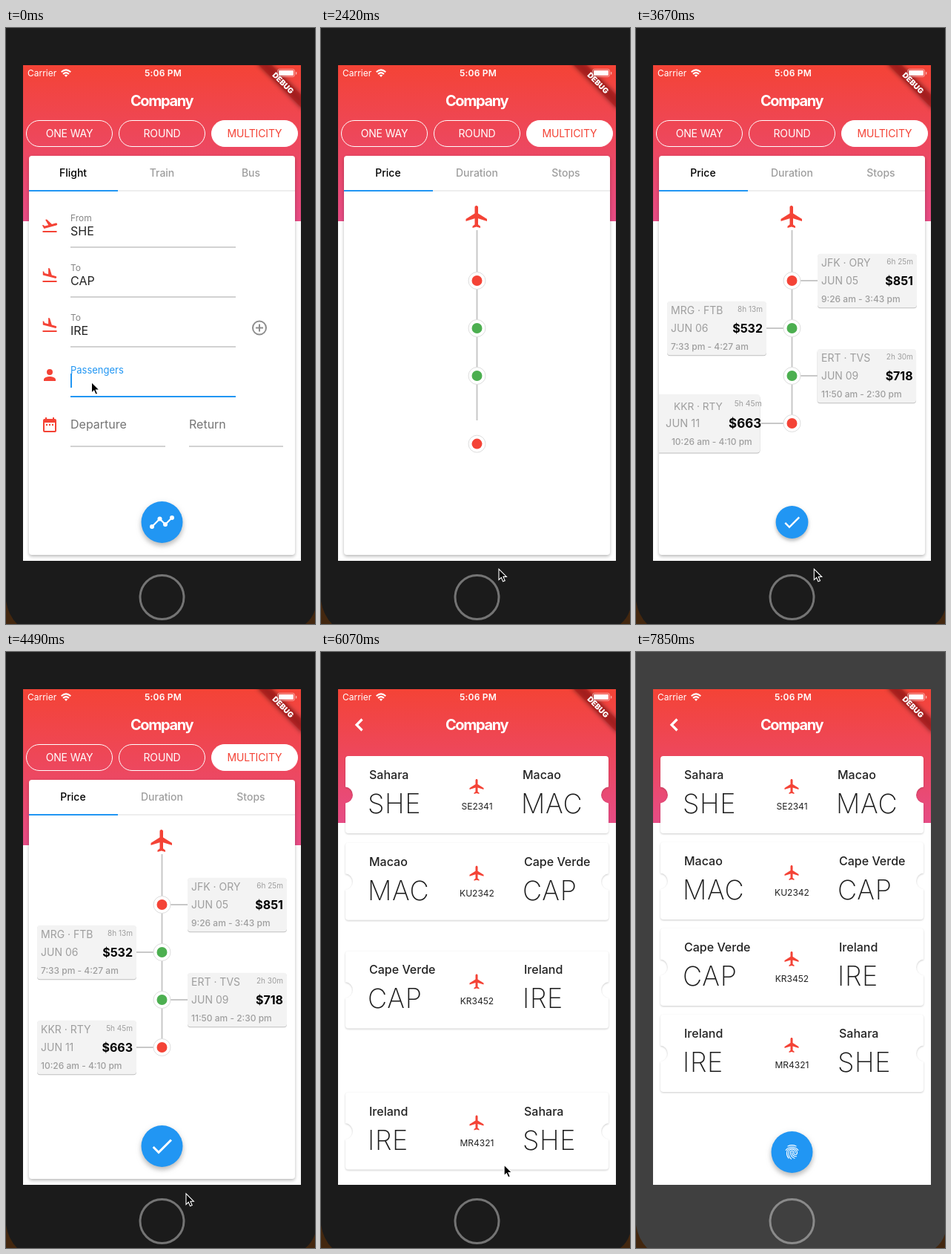
An HTML page for the animation above (7.91 s loop, 417 by 802 pixels).

```html
<!DOCTYPE html>
<html lang="en">
<head>
<meta charset="utf-8">
<title>Flight search</title>
<style>
  html, body { margin: 0; width: 100%; height: 100%; overflow: hidden; background: #1b1b1b; }
  svg { display: block; width: 417px; height: 802px; font-family: Inter, "Open Sans", sans-serif; }
  .title { font-size: 20px; font-weight: 700; letter-spacing: -1.4px; }
  .mid { text-anchor: middle; }
  .end { text-anchor: end; }
  .tab { font-size: 14px; font-weight: 500; text-anchor: middle; fill: #9e9e9e; }
  .tab.on { fill: #000; }
  .pill { font-size: 14px; letter-spacing: -.15px; text-anchor: middle; }
  .label { font-size: 12px; fill: #858585; }
  .value { font-size: 16px; fill: #222; }
  .hint { font-size: 16px; fill: #757575; }
  .city { font-size: 16px; font-weight: 500; fill: #222; }
  .code { font-size: 36px; font-weight: 250; letter-spacing: .7px; fill: #1c1c1c; }
  .flight { font-size: 12px; text-anchor: middle; fill: #222; }
  .card { filter: drop-shadow(0 2px 2px rgba(0,0,0,.28)); }
  .stop { filter: drop-shadow(0 1px .7px rgba(0,0,0,.25)); }
  .fab { filter: drop-shadow(0 4px 3px rgba(0,0,0,.2)) drop-shadow(0 2px 4px rgba(0,0,0,.1)); }
  .ticket { filter: drop-shadow(0 1px 1px rgba(0,0,0,.2)); }
  .banner { filter: drop-shadow(0 0 3px rgba(0,0,0,.8)); }
</style>
</head>
<body>
<svg id="stage" viewBox="0 0 417 802"></svg>
<script>
const LOOP = 7910;
const RED = '#f44336', GREEN = '#4caf50', BLUE = '#2196f3', LINE = '#c8c8c8';

const PATHS = {
  plane: 'M21 16v-2l-8-5V3.5c0-.83-.67-1.5-1.5-1.5S10 2.67 10 3.5V9l-8 5v2l8-2.5V19l-2 1.5V22l3.5-1 3.5 1v-1.5L13 19v-5.5l8 2.5z',
  takeoff: 'M2.5 19h19v2h-19zm19.57-9.36c-.21-.8-1.04-1.28-1.84-1.06L14.92 10l-6.9-6.43-1.93.51 4.14 7.17-4.97 1.33-1.97-1.54-1.45.39 2.59 4.49L21 11.49c.81-.23 1.28-1.05 1.07-1.85z',
  land: 'M2.5 19h19v2h-19zm7.18-5.73l9.66 2.58c.8.21 1.62-.26 1.84-1.06.21-.8-.26-1.62-1.06-1.84l-5.31-1.42-2.76-9.02L10.12 2v8.28L5.15 8.95l-.93-2.32-1.45-.39v5.17z',
  person: 'M12 12a4 4 0 1 0 0-8 4 4 0 0 0 0 8zm0 2c-2.67 0-8 1.34-8 4v2h16v-2c0-2.66-5.33-4-8-4z',
  date: 'M9 11H7v2h2zm4 0h-2v2h2zm4 0h-2v2h2zm2-7h-1V2h-2v2H8V2H6v2H5a2 2 0 0 0-2 2v14a2 2 0 0 0 2 2h14a2 2 0 0 0 2-2V6a2 2 0 0 0-2-2zm0 16H5V9h14z',
  check: 'M9 16.17L4.83 12l-1.42 1.41L9 19 21 7l-1.41-1.41z'
};

const STOPS = [
  ['JFK · ORY', '6h 25m', 'JUN 05', '$851', '9:26 am - 3:43 pm', RED],
  ['MRG · FTB', '8h 13m', 'JUN 06', '$532', '7:33 pm - 4:27 am', GREEN],
  ['ERT · TVS', '2h 30m', 'JUN 09', '$718', '11:50 am - 2:30 pm', GREEN],
  ['KKR · RTY', '5h 45m', 'JUN 11', '$663', '10:26 am - 4:10 pm', RED]
];
const TICKETS = [
  ['Sahara', 'SHE', 'Macao', 'MAC', 'SE2341', 272],
  ['Macao', 'MAC', 'Cape Verde', 'CAP', 'KU2342', 274],
  ['Cape Verde', 'CAP', 'Ireland', 'IRE', 'KR3452', 274],
  ['Ireland', 'IRE', 'Sahara', 'SHE', 'MR4321', 274]
];
// time, x, y
const POINTER = [
  [0, 115, 476], [120, 168, 546], [400, 172, 548], [480, 226, 668], [780, 228, 669],
  [1020, 222, 661], [1780, 222, 661], [2400, 240, 728], [3600, 240, 728], [4300, 243, 729],
  [4490, 243, 729], [5080, 226, 672], [5500, 226, 672], [6070, 247, 690], [6410, 281, 754],
  [7010, 282, 755], [7490, 392, 812], [LOOP, 392, 812]
];

// markup helpers
const text = (x, y, s, cls = '', more = '') => `<text x="${x}" y="${y}" class="${cls}" ${more}>${s}</text>`;
const rect = (x, y, w, h, fill, more = '') => `<rect x="${x}" y="${y}" width="${w}" height="${h}" fill="${fill}" ${more}/>`;
const circle = (x, y, r, more) => `<circle cx="${x}" cy="${y}" r="${r}" ${more}/>`;
const icon = (name, cx, cy, size, fill) =>
  `<path d="${PATHS[name]}" fill="${fill}" transform="translate(${cx - size / 2} ${cy - size / 2}) scale(${size / 24})"/>`;
const fab = (id, glyph) => `<g id="${id}">${circle(0, 0, 28, `fill="${BLUE}" class="fab"`)}${glyph}</g>`;
const tabs = (id, names) =>
  `<g id="${id}">${names.map((n, i) => text(90.5 + 120 * i, 200, n, i ? 'tab' : 'tab on')).join('')}</g>`;
const title = text(210, 105, 'Company', 'title mid', 'fill="#fff"');

function pill(x, label, on) {
  return rect(x + .5, 124.5, 116, 35, on ? '#fff' : 'none', 'rx="17.5" stroke="#fff"') +
    text(x + 58.5, 147, label, 'pill', `fill="${on ? RED : '#fff'}"`);
}

function field(i, name, label, value) {
  const y = 67 * i;
  return icon(name, 59, 266 + y, 24, RED) + text(87, 259.5 + y, label, 'label') +
    text(87, 279 + y, value, 'value') + rect(87, 294.2 + y, 223, 1.5, '#c4c4c4');
}

function form() {
  const dots = [[3, 16], [10, 9], [15, 14], [21, 8]];
  const chart = `<g transform="translate(-18 -18) scale(1.5)" fill="#fff">
    <path d="M3 16L10 9L15 14L21 8" fill="none" stroke="#fff" stroke-width="1.5"/>
    ${dots.map(d => circle(d[0], d[1], 2, '')).join('')}</g>`;
  return `<g id="form">
    ${field(0, 'takeoff', 'From', 'SHE')}${field(1, 'land', 'To', 'CAP')}${field(2, 'land', 'To', 'IRE')}
    <g fill="none" stroke="#8e8e8e" stroke-width="2">${circle(342, 403.5, 9, '')}<path d="M337 403.5h10M342 398.5v10"/></g>
    ${icon('person', 59, 467, 24, RED)}
    ${text(87, 465, 'Passengers', '', `id="focus" fill="${BLUE}"`)}
    ${rect(87, 465, 2, 19, BLUE)}${rect(87, 495, 223, 2, BLUE)}
    ${icon('date', 59, 534, 24, RED)}
    ${text(87, 539, 'Departure', 'hint')}${text(247, 539, 'Return', 'hint')}
    ${rect(87, 562.2, 128, 1.5, '#c4c4c4')}${rect(247, 562.2, 127, 1.5, '#c4c4c4')}
    <g transform="translate(210.5 665)">${fab('fabForm', chart)}</g></g>`;
}

function stop(s) {
  return `<g class="flightStop">${rect(0, 0, 0, 2, LINE)}
    ${rect(-67, -36.2, 134, 72.5, '#f3f3f3', 'rx="4" class="stop"')}
    ${text(0, 0, s[0], '', 'fill="#9e9e9e"')}${text(0, 0, s[1], 'end', 'fill="#9e9e9e"')}
    ${text(0, 0, s[2], '', 'fill="#9e9e9e"')}${text(0, 0, s[3], 'end', 'font-weight="700"')}
    ${text(0, 0, s[4], '', 'fill="#9e9e9e" font-weight="500"')}</g>`;
}

function prices() {
  return `<g id="prices"><g clip-path="url(#panel)">
    <g id="plane">${rect(209.5, 0, 2, 256, LINE)}<g id="planeIcon">${icon('plane', 0, 0, 24, RED)}</g></g>
    ${STOPS.map(stop).join('')}
    ${STOPS.map(s => `<g class="dot">${circle(210.5, 0, 11.5, 'fill="#fff" stroke="#ddd"')}${circle(210.5, 0, 7, `fill="${s[5]}"`)}</g>`).join('')}
    </g><g transform="translate(210.5 665)">${fab('fabPrice', icon('check', 0, 0, 36, '#fff'))}</g></g>`;
}

function ticket([from, a, to, b, code, x]) {
  return `<g class="pass"><path class="ticket" fill="#fff" d="M37 140H384a4 4 0 0 1 4 4V181.5a11 11 0 0 0 0 21.9V240a4 4 0 0 1-4 4H37a4 4 0 0 1-4-4V203.4a11 11 0 0 0 0-21.9V144a4 4 0 0 1 4-4z"/>
    ${text(65, 171, from, 'city')}${text(63, 217, a, 'code')}${text(x, 171, to, 'city')}${text(x - 2, 217, b, 'code')}
    ${icon('plane', 210.5, 181, 24, RED)}${text(210.5, 212, code, 'flight')}</g>`;
}

const finger = `<path fill="none" stroke="#fff" stroke-width="1.1" stroke-linecap="round" d="
  M-5.6-8Q0-10.8 5.6-8M-8.3-2.6Q-5-7 0-7T8.3-2.6
  M-4.4 8.2Q-7.4 4.5-7 .5A7 5.8 0 0 1 7 .5Q7 3.3 4.6 3.3T2.2 .5A2.2 2.2 0 0 0-2.2 .5Q-2 6.5 3.6 8.3
  M-1 9.2Q-5 5.5-4.6 .5A4.6 4.2 0 0 1 4.6 .5M0 .5Q.2 6 6 5.8"/>`;

document.getElementById('stage').innerHTML = `
  <defs>
    <linearGradient id="warm" x1="0" y1="0" x2="0" y2="1"><stop stop-color="${RED}"/><stop offset="1" stop-color="#e64c85"/></linearGradient>
    <clipPath id="screen">${rect(23, 50, 375, 667, '#000')}</clipPath>
    <clipPath id="panel">${rect(31, 220, 359, 489, '#000')}</clipPath>
  </defs>
  ${rect(0, 0, 417, 802, '#1b1b1b', 'id="body"')}
  <path d="M0 771Q3 790 15 802H0zM417 783Q413 795 404 802H417z" fill="#43270f"/>
  ${circle(210.5, 766, 29.5, 'id="home" fill="none" stroke="#747474" stroke-width="3"')}
  <g clip-path="url(#screen)">
    ${rect(23, 50, 375, 667, '#fff')}${rect(23, 50, 375, 210, 'url(#warm)')}
    ${title}${pill(27, 'ONE WAY')}${pill(152, 'ROUND')}${pill(277, 'MULTICITY', true)}
    ${rect(31, 172, 359, 537, '#fff', 'rx="4" class="card"')}
    ${rect(31, 218, 359, 2, '#eee')}${rect(31, 218, 120, 2, BLUE)}
    ${tabs('tabsA', ['Flight', 'Train', 'Bus'])}${tabs('tabsB', ['Price', 'Duration', 'Stops'])}
    ${form()}${prices()}
    <g id="page">
      ${rect(23, 50, 375, 667, '#fff')}${rect(23, 50, 375, 180, 'url(#warm)')}
      ${title}<path d="M55.5 90.5L48 98l7.5 7.5" fill="none" stroke="#fff" stroke-width="3.2"/>
      ${TICKETS.map(ticket).join('')}
      <g transform="translate(210.5 673)">${fab('fabPage', finger)}</g>
    </g>
    <g transform="translate(398 50) rotate(45)">
      ${rect(-44, 28, 88, 12, 'rgba(183,28,28,.63)', 'class="banner"')}
      ${text(0, 37.7, 'DEBUG', 'mid', 'fill="#fff" font-size="10.2" font-weight="900"')}
    </g>
    <g fill="#fff" font-size="12">
      ${text(29, 65, 'Carrier')}${text(212, 65, '5:06 PM', 'mid', 'font-weight="600" letter-spacing=".2"')}
      <g fill="none" stroke="#fff" stroke-width="2"><path d="M74.7 59.2Q81 53.6 87.3 59.2M77 61.9Q81 58.3 85 61.9"/></g>
      <path d="M81 66l-2.3-2.5Q81 61.8 83.3 63.5z"/>
      ${rect(366.5, 55.5, 23, 10, 'none', 'rx="2.5" stroke="#fff" stroke-opacity=".5"')}
      ${rect(368, 57, 20, 7, '#fff', 'rx="1"')}${rect(391, 59, 1.3, 3.5, '#fff', 'rx=".6" opacity=".6"')}
    </g>
  </g>
  <path id="pointer" d="M0 0v14.5l3.3-3.1 2.3 5.3 2.6-1.1-2.3-5.2h4.5z" fill="#000" stroke="#fff" stroke-width="1.1"/>`;

// easing
const clamp = v => Math.min(1, Math.max(0, v));
const span = (v, a, b) => clamp((v - a) / (b - a));
const mix = (a, b, k) => a + (b - a) * k;
const decelerate = k => 1 - (1 - k) ** 2;
function bezier(x1, y1, x2, y2) {
  const at = (a, b, s) => 3 * a * s * (1 - s) ** 2 + 3 * b * s * s * (1 - s) + s ** 3;
  return x => {
    let lo = 0, hi = 1;
    for (let i = 0; i < 20; i++) {
      const m = (lo + hi) / 2;
      if (at(x1, x2, m) < x) lo = m; else hi = m;
    }
    return at(y1, y2, (lo + hi) / 2);
  };
}
const easeOut = bezier(0, 0, .58, 1);
const fastOutSlowIn = bezier(.4, 0, .2, 1);
const elastic = (k, period) => k >= 1 ? 1 :
  2 ** (-10 * k) * Math.sin((k - period / 4) * 2 * Math.PI / period) + 1;

const $ = id => document.getElementById(id);
const all = cls => [...document.getElementsByClassName(cls)];
const flightStops = all('flightStop'), dots = all('dot'), passes = all('pass');
const set = (el, attrs) => { for (const k in attrs) el.setAttribute(k, attrs[k]); };
const move = (el, x, y, s = 1) => set(el, { transform: `translate(${x} ${y}) scale(${s})` });
const show = (el, on) => set(el, { visibility: on ? 'visible' : 'hidden' });

function drawStop(g, i, t) {
  const p = span(t, 2742 + 250 * i, 3342 + 250 * i);
  show(g, p > 0 && t >= 1020);
  if (!p) return;
  const y = 340 + 64 * i, left = i % 2 === 1, far = 165;
  const [line, card, route, time, date, price, hours] = g.children;
  const len = 105 * span(p, 0, .75);
  set(line, { x: left ? 210.5 - len : 210.5, y: y - 1, width: len });

  const v = elastic(span(p, 0, .9), .8);
  move(card, left ? 109 + (1 - v) * far : 312 - (1 - v) * far, y, v);

  const place = (el, a, b, size, mid, atEnd) => {
    const k = elastic(span(p, a, b), .95);
    const x = atEnd
      ? (left ? 204 - 33 * k : 374 - (1 - k) * far)
      : (left ? 47 + (1 - k) * far : 217 + 33 * k);
    set(el, { x, y: y + (mid + size * .36) * k, 'font-size': size * k });
  };
  place(route, .1, 1, 14, -24, false);
  place(time, .05, .95, 10, -25.5, true);
  place(date, .1, .8, 14, 0, false);
  place(price, 0, .9, 16, 0, true);
  place(hours, .1, .95, 12, 25, false);
}

function render(t) {
  // form
  const inForm = t < 1020;
  show($('form'), inForm);
  show($('prices'), !inForm);
  show($('tabsA'), t < 1780);
  show($('tabsB'), t >= 1780);
  const f = span(t, 0, 120);
  set($('focus'), { y: mix(465, 460.5, f), 'font-size': mix(13, 12, f) });

  // plane shrinks, then flies up
  const size = mix(60, 36, easeOut(span(t, 960, 1270)));
  const bottom = mix(693, 272, fastOutSlowIn(span(t, 1780, 2180)));
  move($('plane'), 0, bottom);
  move($('planeIcon'), 210.5, -size / 2, size / 24);

  const d = span(t, 1985, 2485);
  dots.forEach((g, i) => move(g, 0, mix(722, 340 + 64 * i, easeOut(span(d, .2 * i, .2 * i + .4)))));
  flightStops.forEach((g, i) => drawStop(g, i, t));
  move($('fabPrice'), 0, 0, easeOut(span(t, 3492, 3792)));

  // tickets
  set($('page'), { opacity: span(t, 5230, 5470) });
  const p = span(t, 5347, 6407);
  passes.forEach((g, i) => {
    const k = decelerate(span(p, .1 * i, .1 * i + .6));
    move(g, 0, 116 * i + 800 * (1 - k));
  });
  move($('fabPage'), 0, 0, decelerate(span(p, .7, 1)));

  const n = Math.max(1, POINTER.findIndex(q => q[0] > t));
  const a = POINTER[n - 1], b = POINTER[n], k = span(t, a[0], b[0]);
  move($('pointer'), mix(a[1], b[1], k), mix(a[2], b[2], k));

  const last = t >= 7850;
  set($('body'), { fill: last ? '#404040' : '#1b1b1b' });
  set($('home'), { stroke: last ? '#8a8a8a' : '#747474' });
}

const start = performance.now();
function tick(now) {
  render(Math.max(0, now - start) % LOOP);
  requestAnimationFrame(tick);
}
render(0);
requestAnimationFrame(tick);
</script>
</body>
</html>
```
